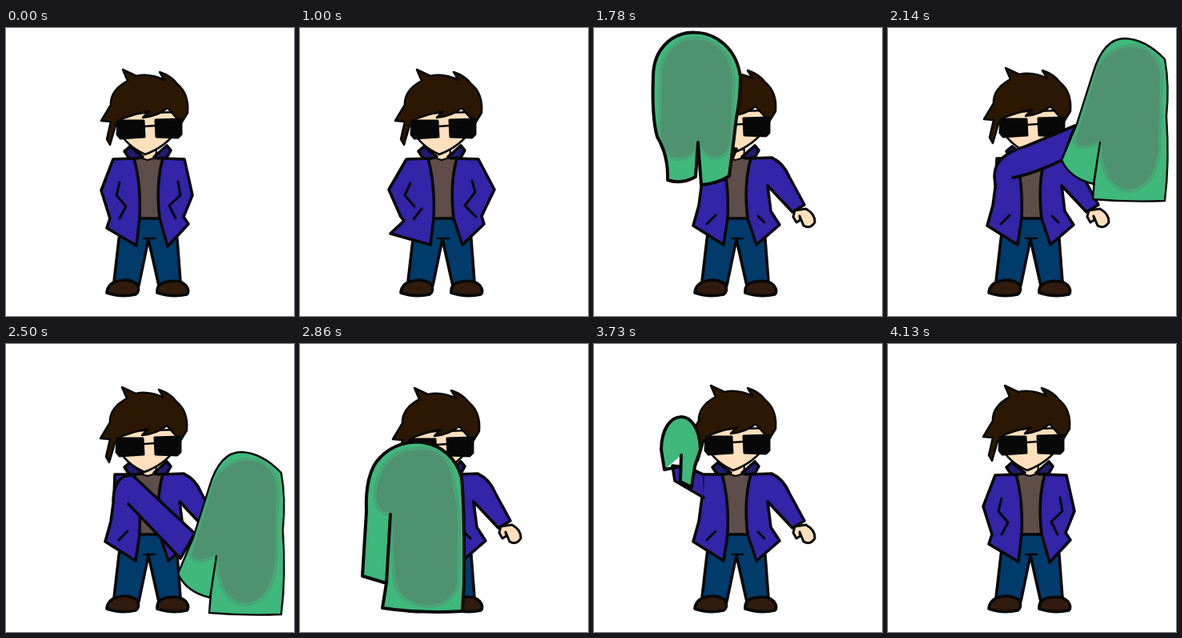
Write an HTML page with a canvas that moves like this. It is 360 px wide and 360 px high and loops after 4.63 s.

```html
<!DOCTYPE html>
<html>
<head>
<meta charset="utf-8">
<style>
html, body { margin: 0; width: 100%; height: 100%; overflow: hidden; background: #fff }
canvas { display: block }
</style>
</head>
<body>
<canvas id="stage" width="360" height="360"></canvas>
<script>
const g = stage.getContext('2d');
g.lineCap = g.lineJoin = 'round';
const BLUE = '#3324a8', NAVY = '#211b70', JEANS = '#003b6b', SKIN = '#ffdfbc',
  HAIR = '#2c1702', SHOE = '#301b0d', SHIRT = '#5f4d49', GREEN = '#3eb87b', SHADE = '#4e926f';

function shape(d, fill, width = 3.6, line = '#080808') {
  const p = new Path2D(d);
  if (fill) { g.fillStyle = fill; g.fill(p); }
  if (width) { g.strokeStyle = line; g.lineWidth = width; g.stroke(p); }
}

function at(x, y, draw) {
  g.save();
  g.translate(x, y);
  draw();
  g.restore();
}

// Jacket halves, sleeve lines and visible hands for each stance
const coats = {
  rest: {
    left: 'M134 164L119 203L130 238L126 250L163 272L167 238Q169 195 160 163Z',
    right: 'M196 163L223 164L233 209L222 236L228 245L202 273L192 238Q187 195 196 163Z',
    lines: 'M142 193L138 209L150 223L142 238M215 192L218 209L204 222L212 238'
  },
  loose: {
    left: 'M133 164L111 202L126 236L130 241L113 257L163 271L167 238Q169 195 160 163Z',
    right: 'M196 163L223 164L243 202L227 235L230 245L203 271L192 238Q187 195 196 163Z',
    lines: 'M138 194L131 209L143 223M142 239L152 226M215 191L219 205L206 222L220 236',
    hands: 'M126 235Q134 228 141 236L140 242L132 242ZM218 229Q224 226 229 232L225 238Z'
  },
  open: {
    left: 'M136 163L135 192L131 222L124 247L162 271L167 238Q169 195 160 163Z',
    right: 'M196 163L222 162Q237 169 244 186L263 221L248 230L217 197L221 229L232 246L203 271L192 238Q187 195 196 163Z',
    lines: 'M141 245L152 234M205 235L213 243',
    hands: 'M251 228L249 236L253 243L258 240L257 235L262 247Q270 252 276 243Q277 233 265 226Z'
  }
};

// Raised or swinging sleeves, left open at the shoulder
const sleeves = {
  down: 'M135 163L111 196L101 224L118 233L137 194',
  side: 'M136 163L113 180L92 196L103 215L137 192',
  lift: 'M136 163L117 154L98 152L101 171L137 192',
  up: 'M136 163Q122 155 117 130L98 118Q92 148 103 162L135 192',
  high: 'M136 163Q119 155 113 117L106 145Q104 167 135 192',
  over: 'M136 192Q130 170 143 150L178 151L162 190',
  top: 'M158 187L194 163L172 124L148 148Q132 166 134 195',
  right: 'M156 187Q180 183 218 165L234 122L172 148Q133 159 133 185L134 196',
  across: 'M158 190L219 219L237 184L155 160Q134 165 134 193',
  low: 'M153 200L218 268L236 237L158 164Q135 163 134 196',
  front: 'M139 197L180 249L207 231L158 164Q135 163 134 196',
  back: 'M137 163L116 197L112 247L121 253L140 194',
  out: 'M137 163L114 171L109 217L120 214L137 193'
};

const mitts = {
  small: ['M101 123L97 98C98 44 145 43 146 98L139 119L135 145L121 138L122 105M121 119L101 123'],
  left: ['M65 147L62 190Q44 200 27 194Q28 163 14 140Q7 115 9 63C11 -8 108 -9 118 65Q118 92 113 116L109 150L104 189Q88 199 69 200Z',
    'M18 66C18 -1 108 -1 110 72L107 141Q105 165 87 167Q71 166 65 147Q62 169 36 168Q15 160 17 130Z'],
  right: ['M265 143L257 195Q227 188 217 165L236 120L256 57Q269 13 296 13Q322 14 346 39Q352 72 348 110Q352 168 346 216Q301 218 256 214L258 190Z',
    'M256 64C263 15 337 4 342 58L340 150Q335 201 300 204Q266 199 265 143Q240 156 232 142Z'],
  front: ['M113 213L108 299L78 290L83 210Q81 161 100 142C130 110 188 117 202 167Q206 210 205 300L203 334Q150 337 103 330L108 299Z',
    'M93 192Q96 145 130 133C169 124 189 136 193 177L199 210L198 300Q190 328 160 328Q120 325 117 290L113 213Q98 214 93 192Z']
};

function mitt(kind, x, y) {
  const [outer, inner] = mitts[kind];
  at(x, y, () => {
    shape(outer, GREEN, 0);
    if (inner) shape(inner, SHADE, 4, '#48a576');
    shape(outer, null, kind == 'right' ? 2.4 : 4);
  });
}

function legs() {
  shape('M145 236L141 265L135 317Q150 325 166 322L178 264L191 322Q207 324 218 317L214 264L210 236Z', JEANS);
  shape('M172 263L186 263M178 264L177 270', null, 2.5);
  shape('M126 331Q127 319 141 316Q153 313 164 320Q168 329 162 333Q143 337 126 331Z', SHOE);
  shape('M189 331Q188 319 202 317Q218 314 225 322Q230 329 226 333Q207 337 189 331Z', SHOE);
}

function coat({ left, right, lines, hands }) {
  shape('M160 162L196 162L192 238L166 238Z', SHIRT);
  shape('M167 152L188 152L187 162L177 165L167 162Z', SKIN, 2);
  if (hands) shape(hands, SKIN, 3);
  shape(left, BLUE);
  shape(right, BLUE);
  shape(lines, null, 3);
  shape('M148 154L155 148L171 161L164 163L154 163Z', NAVY);
  shape('M206 153L201 147L185 161L190 163L201 162Z', NAVY);
}

function head() {
  shape('M140 107L141 128Q150 147 174 158Q201 148 215 126L218 105Z', SKIN, 2.6);
  shape('M130 146L126 139L131 117L119 116L131 96Q130 78 152 66L146 52L163 60Q179 56 198 65L192 55Q207 60 214 70Q229 82 227 106L219 119L202 100Q190 110 171 112L179 104Q162 107 146 113L137 122Z', HAIR, 2.5);
  shape('M173 123L187 122', null, 2.4);
  shape('M140 116L172 116L173 136L143 138L139 133ZM187 115L219 114L219 133L215 137L188 136Z', '#080808', 3);
}

// start, stance, sleeve, mitt, mitt x, mitt y, head x, head y
const poses = [
  [0, 'rest'],
  [1000, 'loose'],
  [1100, 'open', 'down', 'hand', 108, 231],
  [1200, 'open', 'side', 'hand', 95, 207],
  [1300, 'open', 'lift', 'small', -13, 34],
  [1400, 'open', 'up', 'small', 0, 0, -1, -2],
  [1600, 'open', 'high', 'left', 0, 0, 0, -2],
  [1780, 'open', 'over', 'left', 65, -4, 0, -2],
  [1960, 'open', 'top', 'right', -59, -9, 0, -2],
  [2140, 'open', 'right', 'right', 0, 0, 1, -2],
  [2320, 'open', 'across', 'right', 1, 61, 0, 0],
  [2500, 'open', 'low', 'right', -2, 122, -1, 2],
  [2680, 'open', 'front', 'front', 98, 5, -2, 4],
  [2860, 'open', null, 'front', 0, 0, -3, 3],
  [3040, 'open', 'back', 'left', 6, 120, -1, 0],
  [3220, 'open', 'out', 'left', 1, 66, 0, -1],
  [3400, 'open', 'high', 'left', 0, 0, 0, -2],
  [3580, 'open', 'up', 'small', 0, 0, -1, -2],
  [3730, 'open', 'lift', 'small', -13, 34],
  [3830, 'open', 'side', 'hand', 95, 207],
  [3930, 'open', 'down', 'hand', 108, 231],
  [4030, 'loose'],
  [4130, 'rest']
];

function hand(x, y) {
  at(x, y, () => shape('M-7 -6L-9 4L-5 10L0 5L2 11Q11 10 10 2L6 -6Z', SKIN, 3));
}

function frame() {
  const t = performance.now() % 4630;
  const [, stance, sleeve, held, x, y, hx = 0, hy = 0] = poses.findLast(p => p[0] <= t);
  g.fillStyle = '#fff';
  g.fillRect(0, 0, 360, 360);
  legs();
  coat(coats[stance]);
  at(hx, hy, head);
  if (held == 'hand') hand(x, y);
  if (sleeve) shape(sleeves[sleeve], BLUE);
  if (held && held != 'hand') mitt(held, x, y);
  requestAnimationFrame(frame);
}
frame();
</script>
</body>
</html>
```
